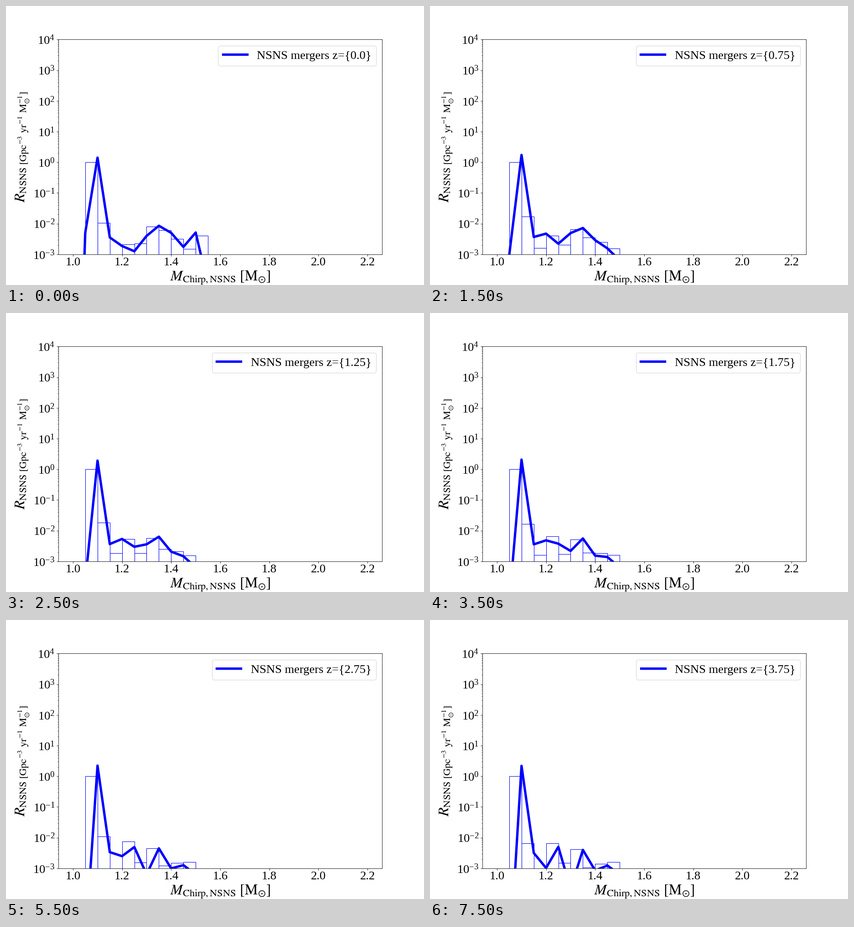
A matplotlib script for the animation above (8000 ms loop, 917 px wide and 611 px high).

```python
import numpy as np
import matplotlib.pyplot as plt
from matplotlib.animation import FuncAnimation

W, H, DPI = 917, 611, 76.4
STEPS, INTERVAL, DZ = 16, 500, 0.25
Z_MAX = (STEPS - 1) * DZ
BIN = 0.05

plt.rcParams.update({
    "font.family": "Liberation Serif",
    "mathtext.fontset": "stix",
    "xtick.labelsize": 25,
    "ytick.labelsize": 25,
    "axes.labelsize": 30,
    "legend.fontsize": 25,
})

mass = 1.05 + BIN * np.arange(10)

# log10 rates per mass at the lowest and the highest redshift
CURVE_NEAR = [-2.3, 0.15, -2.45, -2.73, -2.9, -2.4, -2.07, -2.3, -2.76, -2.29]
CURVE_FAR = [-6.2, 0.34, -2.5, -2.99, -2.3, -3.67, -2.4, -3.07, -2.91, -3.2]
BARS_NEAR = [0, -1.98, -3.2, -2.67, -2.64, -2.1, -2.21, -2.49, -2.82, -2.4]
BARS_FAR = [0, -2.18, -3.5, -2.18, -2.83, -2.38, -2.98, -2.85, -2.79, -4]


def humps(centres, width):
    return sum(np.exp(-((mass - c) / width) ** 2) for c in centres)


CURVE_SWELL = 0.6 * humps((1.05, 1.2, 1.3), 0.03)
BARS_SWELL = 0.65 * humps((1.14,), 0.05)


def rates(near, far, swell, z):
    """Ease from near to far, with some masses swelling on the way."""
    # The heaviest mergers fade out early
    span = np.where(mass > 1.49, 0.75, Z_MAX)
    ease = np.sin(np.pi / 2 * np.minimum(z / span, 1))
    mid = np.sin(np.pi * (z / Z_MAX) ** 0.75)
    near, far = np.array(near), np.array(far)
    return 10 ** (near + (far - near) * ease + swell * mid)


def curve_values(z):
    inner = rates(CURVE_NEAR, CURVE_FAR, CURVE_SWELL, z)
    return np.concatenate([[1e-14], inner, [1e-4]])


def bar_values(z):
    heights = rates(BARS_NEAR, BARS_FAR, BARS_SWELL, z)
    heights[0] = 1
    return heights


def legend_label(z):
    return f"NSNS mergers z={{{z}}}"


# The small margin keeps the canvas from rounding down a pixel
fig = plt.figure(figsize=((W + 0.001) / DPI, (H + 0.001) / DPI), dpi=DPI)
ax = fig.add_subplot()
ax.set_yscale("log")

bars = ax.bar(mass, bar_values(0), width=BIN, align="edge", bottom=1e-9,
              fill=False, edgecolor="blue", linewidth=1)
knots = np.concatenate([[mass[0] - BIN], mass, [mass[-1] + BIN]])
line, = ax.plot(knots, curve_values(0), color="blue", linewidth=5,
                label=legend_label(0.0))

ax.set_xlim(0.94, 2.26)
ax.set_ylim(1e-3, 1e4)
ax.set_xticks(np.arange(1.0, 2.3, 0.2))
ax.xaxis.set_major_formatter("{x:.1f}")
ax.set_xlabel(r"$M_{\mathrm{Chirp,NSNS}}\ [\mathrm{M}_{\odot}]$")
ax.set_ylabel(r"$R_{\mathrm{NSNS\ [Gpc^{-3}\ yr^{-1}\ M_{\odot}^{-1}]}}$")
legend = ax.legend(loc="upper right")


def update(i):
    z = i * DZ
    line.set_ydata(curve_values(z))
    for bar, height in zip(bars, bar_values(z)):
        bar.set_height(height)
    legend.get_texts()[0].set_text(legend_label(z))
    return [line, *bars, legend]


anim = FuncAnimation(fig, update, frames=STEPS, interval=INTERVAL,
                     init_func=lambda: update(0), repeat=True, repeat_delay=0)
plt.show()
```
